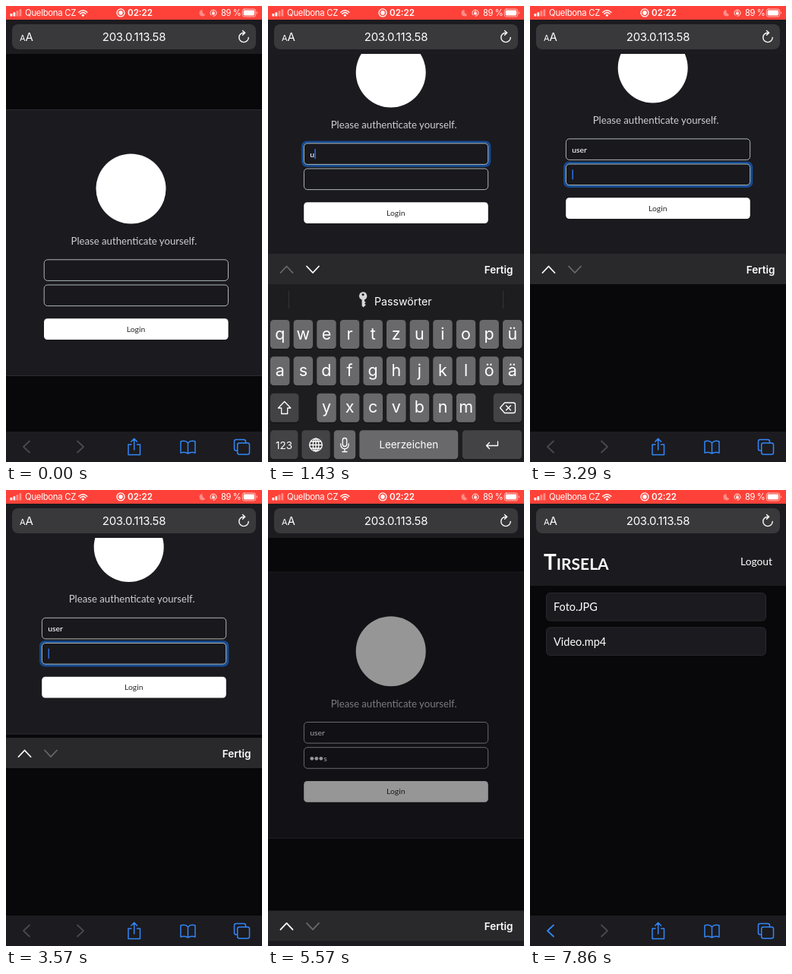
An HTML page for the animation above (8000 ms loop, 337x600 px).

```html
<!DOCTYPE html>
<html lang="de">
<head>
<meta charset="utf-8">
<title>Login on a phone</title>
<style>
  html, body { margin: 0; width: 100%; height: 100%; overflow: hidden; background: #08070a; }
  svg { display: block; width: 100vw; height: 100vh; }
  text { font-family: Inter, Roboto, sans-serif; fill: #fff; white-space: pre; }
  .web text { font-family: Lato, "Open Sans", sans-serif; }
  .line { fill: none; stroke-linecap: round; stroke-linejoin: round; }
  .mid { text-anchor: middle; }
  .end { text-anchor: end; }
  .blue { stroke: #3286f8; stroke-width: 1.5; }
</style>
</head>
<body>
<svg viewBox="0 0 337 600" xmlns="http://www.w3.org/2000/svg">
  <rect width="337" height="600" fill="#08070a"/>

  <g id="login" class="web">
    <rect x="-5" y="136" width="350" height="351" fill="#1b1a1f"/>
    <path d="M-5 136.5H345M-5 486.5H345" stroke="#2b2a2f"/>
    <circle cx="164.5" cy="240.5" r="46" fill="#fff"/>
    <text class="mid" x="168.4" y="314" font-size="13.2" style="fill:#cfcfd1">Please authenticate yourself.</text>
    <rect id="ring" x="46.9" width="249.2" height="34.2" rx="7" fill="#154b93"/>
    <g fill="#19181d" stroke="#adb6af">
      <rect x="50.2" y="333.8" width="242.3" height="27.6" rx="4.5"/>
      <rect x="50.2" y="367" width="242.3" height="27.6" rx="4.5"/>
    </g>
    <text id="user" x="58" y="351.8" font-size="10.4" font-weight="500"></text>
    <g id="dots" fill="#fff"></g>
    <text id="pass" y="385" font-size="10.4" font-weight="500"></text>
    <rect id="caret" width="1.5" height="13" fill="#2f6fe4"/>
    <rect x="50" y="411.2" width="242.6" height="27.8" rx="4.5" fill="#fff"/>
    <text class="mid" x="171" y="428.8" font-size="10.4" style="fill:#2b2b2b">Login</text>
  </g>

  <g id="files" class="web">
    <rect y="60" width="337" height="66" fill="#1b1a1f"/>
    <text x="18" y="105" font-size="28" font-weight="700">T<tspan font-size="21">IRSELA</tspan></text>
    <text class="end" x="319" y="99" font-size="13.8">Logout</text>
    <g fill="#1b1a1f" stroke="#29282d">
      <rect x="21.5" y="135.5" width="289" height="36.5" rx="5"/>
      <rect x="21.5" y="180.8" width="289" height="36.7" rx="5"/>
    </g>
    <text x="31" y="159" font-size="14.5">Foto.JPG</text>
    <text x="31" y="204.7" font-size="14.5">Video.mp4</text>
  </g>

  <g id="tools">
    <rect y="560" width="337" height="40" fill="#1c1b1f"/>
    <g class="line" stroke-width="1.8">
      <path id="back" d="M31 572.5L23 580L31 587.5"/>
      <path d="M94 572.5L102 580L94 587.5" stroke="#4a4a4d"/>
    </g>
    <g class="line blue">
      <path d="M165 577H161V590.5H176.5V577H172.5M168.7 584V569.5M164.8 573.2L168.7 569.3L172.6 573.2"/>
      <path d="M239.5 575C237 572 233 572 230 573V588C233 587 237 587 239.5 589C242 587 246 587 249 588V573C246 572 242 572 239.5 575V589"/>
      <path d="M304.5 585H303Q300.5 585 300.5 582.5V573Q300.5 570.5 303 570.5H313Q315.5 570.5 315.5 573V575"/>
      <rect x="304.7" y="575" width="15.8" height="15" rx="2.5"/>
    </g>
  </g>

  <g id="panel">
    <g id="keys"><rect y="366" width="337" height="240" fill="#1d1d1f"/></g>
    <rect y="326" width="337" height="40" fill="#29282b"/>
    <g class="line" stroke-width="1.8">
      <path id="up" d="M16.5 351L24.5 342.5L32.5 351"/>
      <path id="down" d="M51 342.5L59 351L67 342.5"/>
    </g>
    <text class="end" x="322.5" y="352" font-size="13.5" font-weight="600">Fertig</text>
  </g>

  <g id="chrome">
    <rect y="17" width="337" height="46" fill="#1c1b1f"/>
    <rect x="8" y="24" width="321" height="33" rx="8" fill="#39383b"/>
    <text x="18" y="46" font-size="11">A<tspan font-size="15">A</tspan></text>
    <text class="mid" x="168.5" y="46" font-size="15" letter-spacing="-.3">203.0.113.58</text>
    <path class="line" d="M313 35.2A6.2 6.2 0 1 0 319.2 41.4M311.5 32.5L314.7 35.3L311.5 38.3" stroke="#fff" stroke-width="1.4"/>
    <rect width="337" height="18" fill="#fe4239"/>
    <g fill="#fff">
      <rect x="5.5" y="10" width="2.8" height="3.5" rx=".6"/>
      <rect x="9.5" y="8.3" width="2.8" height="5.2" rx=".6"/>
      <g opacity=".4">
        <rect x="13.5" y="6.2" width="2.8" height="7.3" rx=".6"/>
        <rect x="17.5" y="4.3" width="2.8" height="9.2" rx=".6"/>
        <path d="M258.6 5A4.2 4.2 0 1 0 262.4 11.2A4.8 4.8 0 0 1 258.6 5Z"/>
      </g>
      <path d="M101.3 14.2L99.2 11.9Q101.3 10.2 103.4 11.9Z"/>
      <circle cx="151" cy="8.9" r="2.8"/>
      <rect x="271.3" y="8.6" width="3.4" height="2.8" rx=".5"/>
      <rect x="312.7" y="5.5" width="14.5" height="7" rx="1.4"/>
      <path d="M330.3 7.3Q332 9 330.3 10.7Z"/>
    </g>
    <g class="line" stroke="#fff">
      <path d="M95.8 8.2Q101.3 3.2 106.8 8.2M97.7 10.3Q101.3 7 104.9 10.3" stroke-width="1.5"/>
      <circle cx="151" cy="8.9" r="5" stroke-width="1.3"/>
      <path d="M270 12A4.1 4.1 0 1 1 273 13.3M272 8.6V7.8A1 1 0 0 1 274 7.8V8.6" stroke-width=".9"/>
      <rect x="311.2" y="4" width="17.5" height="10" rx="2.6" stroke-width=".9" opacity=".7"/>
    </g>
    <text x="25" y="13.2" font-size="11.3" letter-spacing="-.25">Quelbona CZ</text>
    <text x="160" y="13.3" font-size="11.6" font-weight="600">02:22</text>
    <text x="283" y="13.2" font-size="11.2" letter-spacing="-.4">89 %</text>
  </g>
</svg>
<script>
const LOOP = 8000;
const el = Object.fromEntries(
  [...document.querySelectorAll('[id]')].map(n => [n.id, n]));

// Keyboard
const LIGHT = '#69696b', DARK = '#434345', STEP = 30.6;
const key = (x, y, w, fill) =>
  `<rect x="${x}" y="${y + 1}" width="${w}" height="38" rx="4.5" fill="#0e0e10"/>` +
  `<rect x="${x}" y="${y}" width="${w}" height="38" rx="4.5" fill="${fill}"/>`;
const label = (s, x, y, size) =>
  `<text class="mid" x="${x}" y="${y}" font-size="${size}">${s}</text>`;
const row = (letters, x0, y) => [...letters].map((c, i) => {
  const x = x0 + i * STEP;
  return key(x, y, 25.5, LIGHT) + label(c, x + 12.75, y + 25.5, 21.5);
}).join('');

function keyboard() {
  return `
    <path d="M27.5 375V398M309.5 375V398" stroke="#333336"/>
    <g fill="#d6d6d8"><path fill-rule="evenodd" d="M125 376.2a5.3 5.3 0 0 1 2 10.2v2l1.8 1.6-1.8 1.6 1.8 1.7-3.2 3.2-2-2v-8a5.3 5.3 0 0 1 1.4-10.3zm0 2a1.6 1.6 0 1 0 .1 0z"/></g>
    <text x="140" y="393.5" font-size="14.2">Passwörter</text>` +
    row('qwertzuiopü', 3, 413) + row('asdfghjklöä', 3, 461.3) + row('yxcvbnm', 64.3, 509.8) +
    key(3, 509.8, 37.5, DARK) + key(296.7, 509.8, 37.5, DARK) +
    key(3, 558.3, 36.5, DARK) + key(44.3, 558.3, 37.5, DARK) + key(86.7, 558.3, 28.5, LIGHT) +
    key(120.3, 558.3, 130, LIGHT) + key(255.7, 558.3, 78.5, DARK) +
    label('123', 21, 583, 13.5) + label('Leerzeichen', 185.3, 582, 13.4) + `
    <g class="line" stroke="#fff" stroke-width="1.3">
      <path d="M21.7 520.5L13.5 529H17.7V536.5H25.7V529H29.9Z"/>
      <path d="M311.5 522H323Q325.5 522 325.5 524.5V533Q325.5 535.5 323 535.5H311.5L305.5 528.8ZM313.5 525.8L319.5 531.8M319.5 525.8L313.5 531.8"/>
      <circle cx="63" cy="577.5" r="8.3"/><ellipse cx="63" cy="577.5" rx="3.8" ry="8.3"/>
      <path d="M54.7 577.5H71.3M63 569.2V585.8M56.5 573H69.5M56.5 582H69.5"/>
      <rect x="98.3" y="568.5" width="5.4" height="11" rx="2.7"/>
      <path d="M95.8 576V577.5A5.2 5.2 0 0 0 106.2 577.5V576M101 583V586.5M98 586.5H104"/>
      <path d="M302.5 573V578.5H287.5M291.5 574.5L287.5 578.5L291.5 582.5"/>
    </g>`;
}
el.keys.innerHTML += keyboard();
el.dots.innerHTML = [0, 1, 2].map(i => `<circle cx="${60.6 + 6 * i}" cy="381.6" r="2.4"/>`).join('');
const dots = [...el.dots.children];

// Timing
const lin = (t, start, dur) => Math.min(1, Math.max(0, (t - start) / dur));
const out = (t, start, dur) => 1 - (1 - lin(t, start, dur)) ** 2;
const typed = (t, times) => times.filter(at => t >= at).length;
const show = (node, on) => node.setAttribute('visibility', on ? 'visible' : 'hidden');

const OPEN = 320, NEXT = 3140, SEND = 5330, LOADED = 5880;
const USER = 'user', USER_AT = [1430, 1860, 2290, 2720];
const PASS = 'pass', PASS_AT = [3990, 4290, 4710, 5000];

function draw(t) {
  const focus = t < OPEN || t >= SEND ? 0 : t < NEXT ? 1 : 2;
  const leave = out(t, SEND, 410);

  const dx = -2.8 * out(t, OPEN, 750);
  const dy = -(153 * out(t, OPEN, 750) + 13.6 * out(t, NEXT, 600)) * (1 - leave);
  el.login.setAttribute('transform', `translate(${dx} ${dy})`);
  el.login.setAttribute('opacity', 1 - lin(t, SEND, 570));
  el.files.setAttribute('opacity', lin(t, LOADED, 250));

  const hidden = 1 - out(t, OPEN, 450) + leave;
  el.panel.setAttribute('transform', `translate(0 ${274 * hidden})`);
  show(el.panel, hidden < 1);
  show(el.keys, hidden < 1 && t < NEXT);
  el.up.setAttribute('stroke', t < NEXT ? '#69696c' : '#fff');
  el.down.setAttribute('stroke', t < NEXT ? '#fff' : '#69696c');
  el.back.setAttribute('stroke', t < LOADED ? '#4a4a4d' : '#3286f8');

  el.user.textContent = USER.slice(0, typed(t, USER_AT));
  const n = typed(t, PASS_AT), px = 58 + 6 * Math.max(0, n - 1);
  dots.forEach((d, i) => show(d, i < n - 1));
  el.pass.textContent = n ? PASS[n - 1] : '';
  el.pass.setAttribute('x', px);

  show(el.ring, focus);
  show(el.caret, focus);
  if (focus) {
    const top = focus === 1 ? 333.8 : 367;
    const end = focus === 1 ? 58 + el.user.getComputedTextLength()
                            : px + el.pass.getComputedTextLength();
    el.ring.setAttribute('y', top - 3.3);
    el.caret.setAttribute('x', end + 0.3);
    el.caret.setAttribute('y', top + 7.3);
  }
}

const begin = performance.now();
function tick() {
  draw((performance.now() - begin) % LOOP);
  requestAnimationFrame(tick);
}
tick();
</script>
</body>
</html>
```
